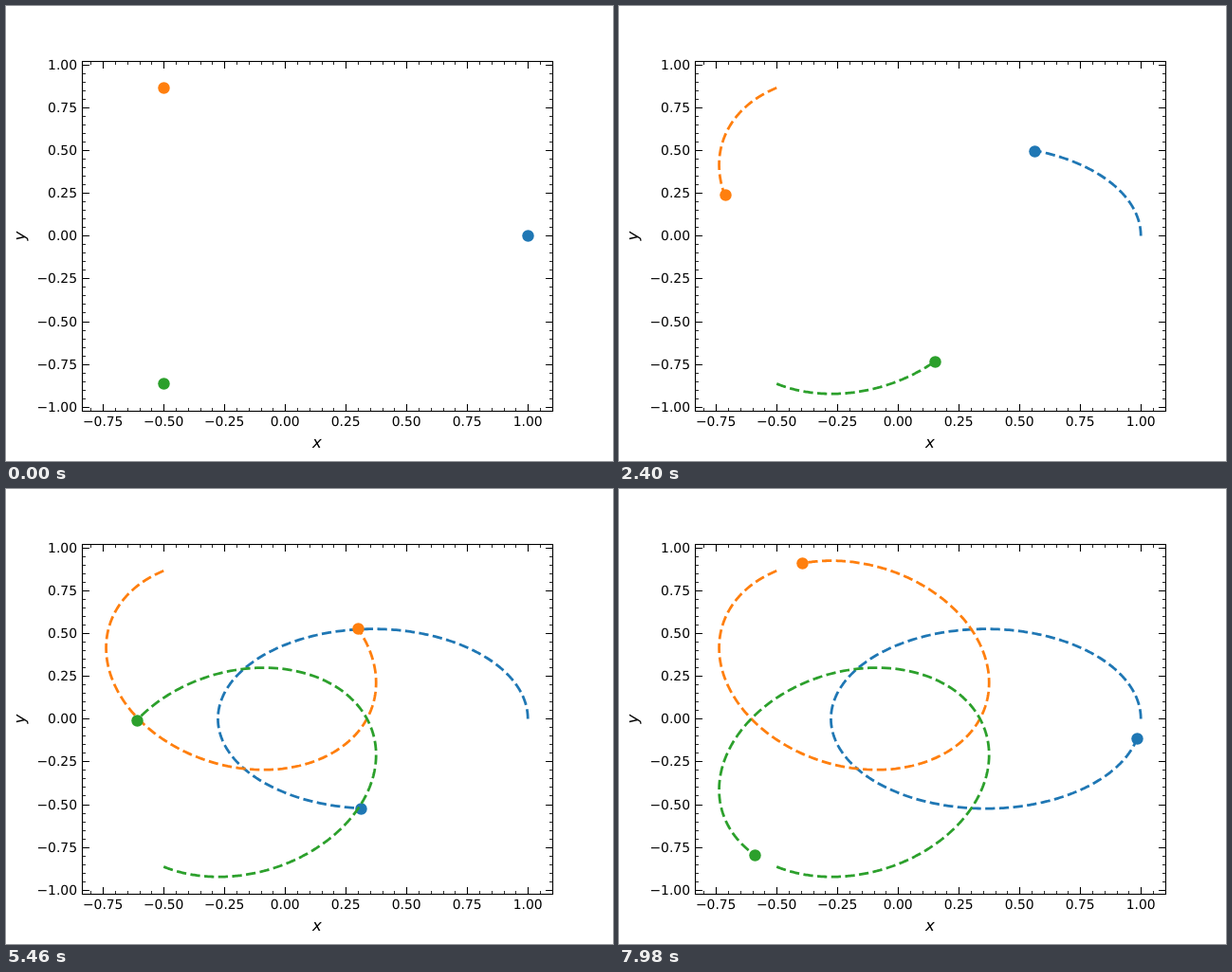
An HTML page that plays this animation: 640 px wide and 480 px high, repeating every 8 s.

```html
<!DOCTYPE html>
<html lang="en">
<head>
<meta charset="utf-8">
<title>Three bodies on elliptic orbits</title>
<style>
  html, body { margin: 0; width: 100%; height: 100%; overflow: hidden; background: #fff; }
  svg { display: block; width: 640px; height: 480px; }
  text { font: 13.89px "DejaVu Sans", sans-serif; text-rendering: geometricPrecision; }
  .axis { font-size: 16.67px; font-style: italic; text-anchor: middle; }
  .xtick { text-anchor: middle; }
  .ytick { text-anchor: end; }
  .frame { fill: none; stroke: #000; stroke-width: 1.1; }
  .minor { fill: none; stroke: #000; stroke-width: .83; }
  .trail { fill: none; stroke-width: 2.78; stroke-dasharray: 10.28 4.44; stroke-linejoin: round; }
</style>
</head>
<body>
<svg viewBox="0 0 640 480">
  <g id="bodies"></g>
  <g id="axes">
    <rect class="frame" x="80.5" y="58.5" width="496" height="369"/>
    <text class="axis" x="328" y="465.5">x</text>
    <text class="axis" transform="translate(19.5 242.5) rotate(-90)">y</text>
  </g>
</svg>
<script>
const STEP = 20, STEPS = 400;
const LEFT = 80, RIGHT = 577, TOP = 58, BOTTOM = 428;
const toX = x => 294.2 + 256 * x;
const toY = y => 242.4 - 180.2 * y;
const snap = v => Math.round(v) + 0.5;

function add(parent, tag, attributes, content = '') {
  const node = document.createElementNS('http://www.w3.org/2000/svg', tag);
  for (const key in attributes) node.setAttribute(key, attributes[key]);
  node.textContent = content;
  parent.appendChild(node);
  return node;
}

// Axes: ticks every 0.05, every fifth one is major and labelled
const axes = document.getElementById('axes');
const paths = { frame: '', minor: '' };
const label = v => v.toFixed(2).replace('-', '\u2212');

for (let i = -20; i <= 21; i++) {
  const value = i / 20, major = i % 5 === 0;
  const kind = major ? 'frame' : 'minor', size = major ? 7 : 3;
  if (i >= -16) {
    const x = snap(toX(value));
    paths[kind] += `M${x} ${TOP}v${size + 1}M${x} ${BOTTOM}v${-size - 1}`;
    if (major) add(axes, 'text', { class: 'xtick', x: toX(value), y: 443 }, label(value));
  }
  if (i <= 20) {
    const y = snap(toY(value));
    paths[kind] += `M${LEFT} ${y}h${size + 1}M${RIGHT} ${y}h${-size - 1}`;
    if (major) add(axes, 'text', { class: 'ytick', x: 75, y: Math.round(toY(value)) + 5 }, label(value));
  }
}
for (const kind in paths) add(axes, 'path', { class: kind, d: paths[kind] });

// Kepler orbit around the origin, starting at its far point (1, 0)
const NEAR = 0.27634;
const major = (1 + NEAR) / 2, minor = Math.sqrt(NEAR), centre = (1 - NEAR) / 2;
const ecc = centre / major;
const RATE = 0.7449; // radians of mean anomaly per second

function orbit(seconds) {
  const mean = RATE * seconds;
  let E = mean;
  for (let i = 0; i < 30; i++) {
    E -= (E + ecc * Math.sin(E) - mean) / (1 + ecc * Math.cos(E));
  }
  return [centre + major * Math.cos(E), minor * Math.sin(E)];
}

const track = Array.from({ length: STEPS }, (_, i) => orbit(i * STEP / 1000));
const group = document.getElementById('bodies');

const bodies = ['#1f77b4', '#ff7f0e', '#2ca02c'].map((color, k) => {
  const c = Math.cos(k * 2 * Math.PI / 3), s = Math.sin(k * 2 * Math.PI / 3);
  return {
    points: track.map(([x, y]) => [toX(c * x - s * y), toY(s * x + c * y)]),
    trail: add(group, 'polyline', { class: 'trail', stroke: color }),
    dot: add(group, 'circle', { r: 6.25, fill: color })
  };
});

let shown = -1;
function draw(now) {
  const step = Math.floor(now / STEP) % STEPS;
  if (step !== shown) {
    shown = step;
    for (const { points, trail, dot } of bodies) {
      const line = points.slice(0, step + 1).map(p => p.map(v => v.toFixed(2)).join());
      trail.setAttribute('points', step ? line.join(' ') : '');
      dot.setAttribute('cx', snap(points[step][0]));
      dot.setAttribute('cy', snap(points[step][1]));
    }
  }
}

const start = performance.now();
function tick() {
  draw(performance.now() - start);
  requestAnimationFrame(tick);
}
tick();
</script>
</body>
</html>
```
